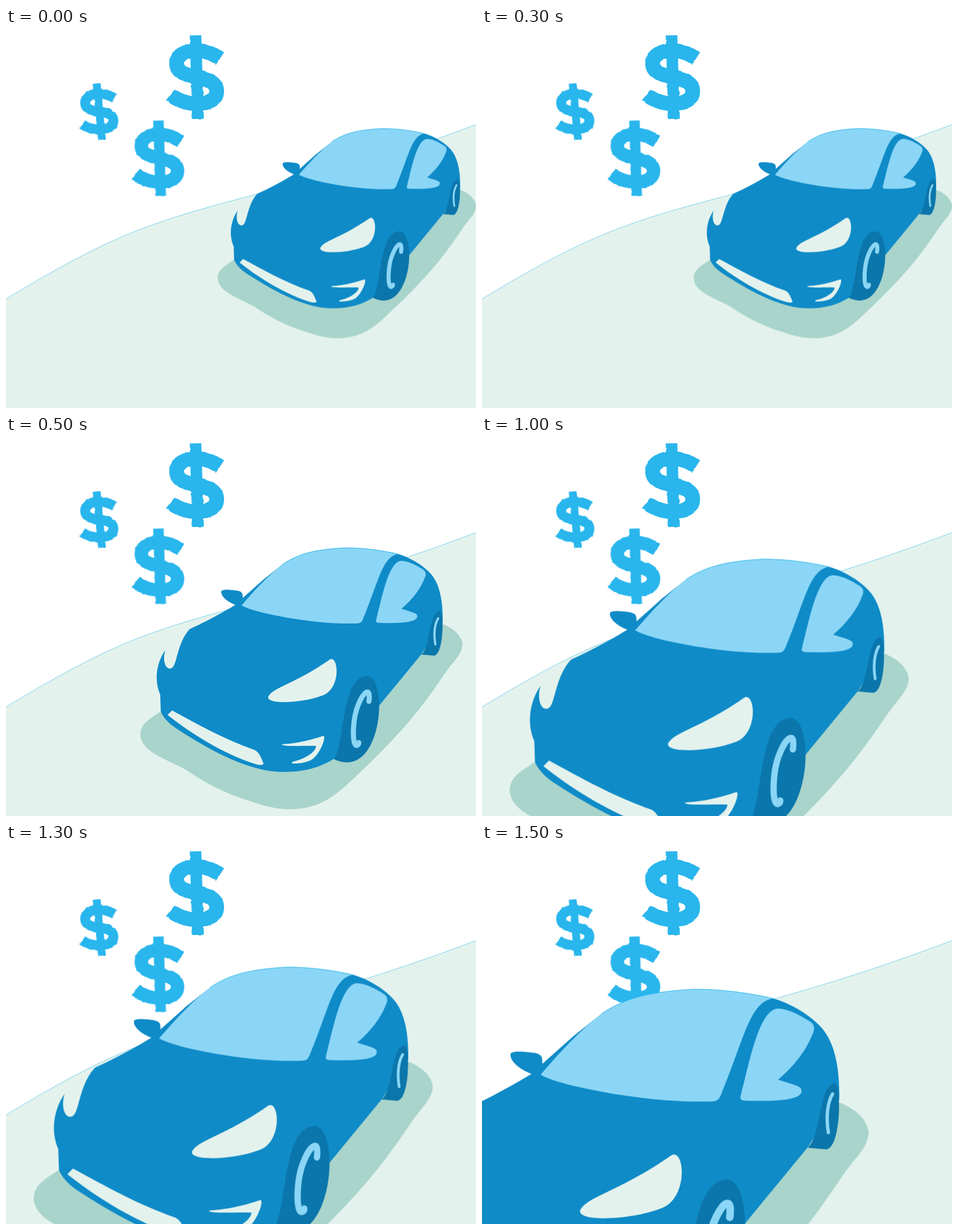
Recreate the animation shown at these times as an HTML page. Size 832 by 673 pixels, loop 2000 ms.

```html
<!DOCTYPE html>
<html lang="en">
<head>
<meta charset="utf-8">
<title>Car driving downhill</title>
<style>
  html, body { margin: 0; width: 100%; height: 100%; overflow: hidden; background: #fff; }
  svg { display: block; width: 832px; height: 673px; }
  .shade { fill: #a9d4cb; }
  .body { fill: #0f8bc8; }
  .wheel { fill: #0b76ab; }
  .glass { fill: #8bd6f6; }
  .pale { fill: #e3f2ed; }
  .rim { fill: none; stroke: #8bd6f6; stroke-linecap: round; }
  .edge { fill: none; stroke: #29b6ed; vector-effect: non-scaling-stroke; }
  .money { fill: none; stroke: #29b6ed; filter: url(#rough); }
</style>
</head>
<body>
<svg viewBox="0 0 832 673">
  <defs>
    <filter id="rough" color-interpolation-filters="sRGB">
      <feTurbulence type="fractalNoise" baseFrequency=".15" seed="4"/>
      <feDisplacementMap in="SourceGraphic" scale="3" xChannelSelector="R" yChannelSelector="G"/>
    </filter>
    <g id="dollar">
      <path stroke-width="26" d="M379 54C362 43 350 40 337 40C316 40 302 49 302 63C302 78 316 82 337 87
        C360 92 373 97 373 112C373 127 358 134 338 134C320 134 305 129 291 118"/>
      <path stroke-width="20.5" d="M335.5 13L340 161"/>
    </g>
  </defs>

  <path class="pale" stroke="#29b6ed" stroke-width=".6"
    d="M-2 481L0 480C85 428 170 381 250 352C315 328 380 311 445 294C575 260 700 221 832 171L840 168V680H-2Z"/>
  <g class="money">
    <use href="#dollar"/>
    <use href="#dollar" transform="translate(165.2 148) rotate(-3.7) scale(.675) translate(-337.7 -87)"/>
    <use href="#dollar" transform="translate(-33.8 152.2) scale(.905 .9)"/>
  </g>
  <g id="car"></g>
</svg>
<script>
const roof = 'C520 207 550 201 600 198C635 198 668 203 694 209';

const car = document.getElementById('car');
car.innerHTML = `
  <path class="shade" d="M773 333C796 342 808 357 808 370C806 388 795 395 778 419C745 467 715 515 600 621
    C574 643 553 656 520 660C485 664 460 656 430 646C390 634 350 613 320 592
    C285 572 238 560 238 528C238 510 255 500 274 488Z"/>
  <path class="body" d="M419 287L456 254L490 227${roof}C715 215 737 228 751 243C765 258 774 285 773 330
    L735 387L661 477L620 560L580 572C545 594 505 598 465 593C405 583 345 546 300 517
    C288 509 278 498 274 488L273 458C264 438 263 407 282 379C277 395 281 412 290 412
    C304 412 300 370 325 342C345 333 375 318 406 299C393 294 381 285 381 276
    C381 270 402 273 410 274C420 276 419 281 419 287Z"/>

  <path class="glass" d="M417 300C441 272 464 247 490 227${roof}C666 214 661 254 632 324
    C629 332 625 332 615 332C570 333 510 326 455 313C440 309 428 306 417 300Z"/>
  <path class="edge" d="M490 227${roof}"/>
  <path class="glass" d="M656 323C666 285 677 224 699 221C713 221 728 230 739 237C744 241 744 246 741 252
    C734 270 720 289 700 306C722 313 729 314 728 320C727 330 700 332 662 331C655 331 654 329 656 323Z"/>

  <path class="wheel" d="M735 387C752 375 748 311 768 310C776 313 775 389 757 389Z"/>
  <path class="rim" stroke-width="4" d="M765 323C759 333 757 350 760 369"/>
  <path class="wheel" d="M580 572C600 555 591 425 640 425C675 430 667 578 604 578C596 578 588 576 580 572Z"/>
  <path class="rim" stroke-width="9"
    d="M642.5 470C646 441 632 455 624 475C613 500 612 549 621 548C625 546 624 546 624.5 543"/>

  <path class="pale" d="M464 462C472 445 510 440 573 396C589 387 594 449 559 460C525 473 462 476 464 462Z"/>
  <path class="pale" d="M286 494L294 486C340 511 388 538 440 556C450 561 452 572 456 580
    C455 583 450 583 445 582C400 569 340 537 286 494Z"/>
  <path class="pale" d="M488 546C520 544 540 538 562 531C568 533 553 572 535 576C525 580 515 580 506 580
    L507 577C530 572 548 560 549 549C525 548 490 551 488 546Z"/>`;

// The car jumps closer every half second; each pose is scale, x, y
const poses = [[.802, 184, 19.2], [1, 0, 0], [1.239, -245.7, -27.3], [1.485, -515.5, -36.9]];
function draw() {
  const [scale, x, y] = poses[Math.floor(performance.now() % 2000 / 500)];
  car.setAttribute('transform', `translate(${x} ${y}) scale(${scale})`);
  requestAnimationFrame(draw);
}
draw();
</script>
</body>
</html>
```
